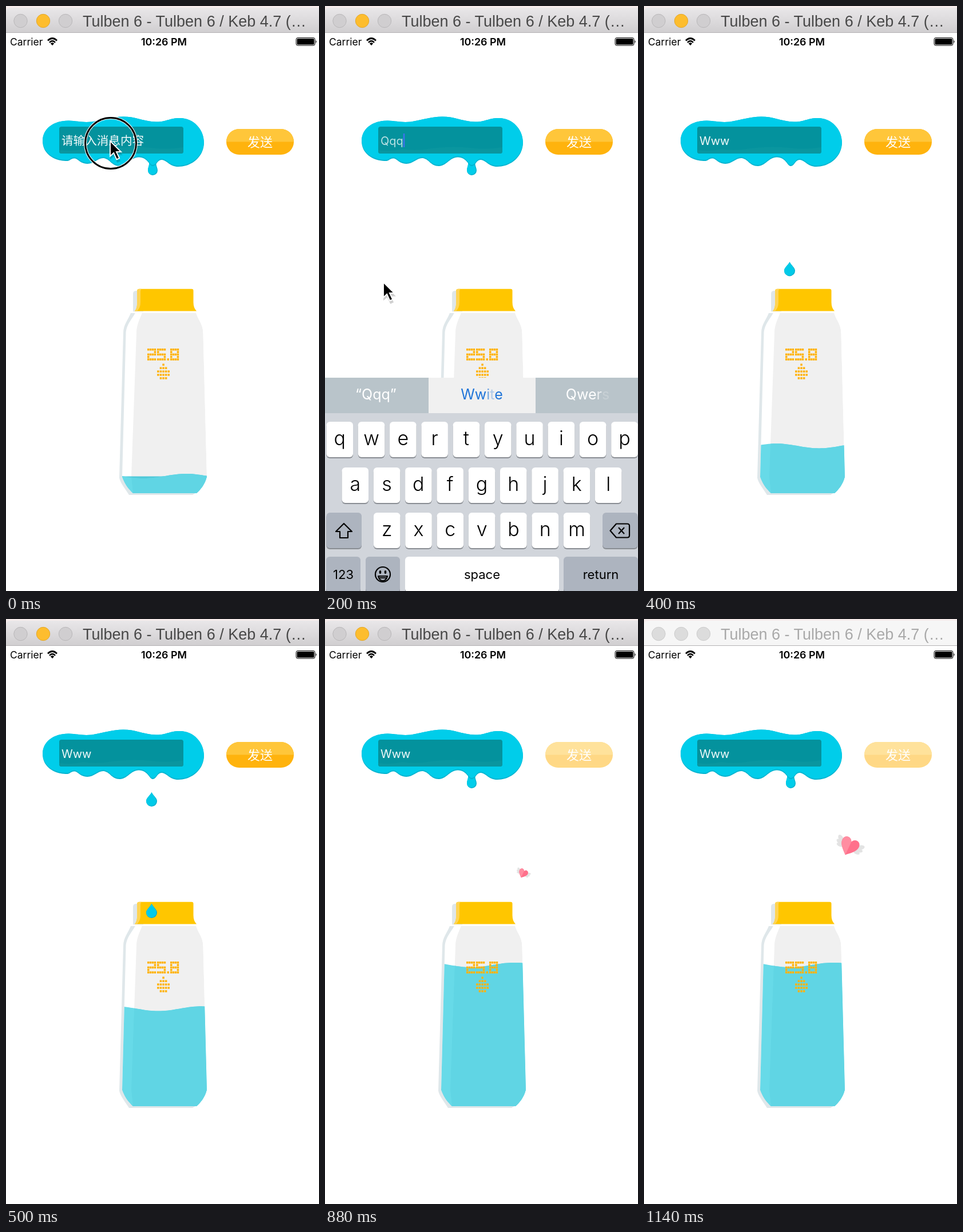
These frames come from a looping animation (547 by 1023 pixels, 1.16 s). An HTML page:

```html
<!DOCTYPE html>
<html lang="zh">
<head>
<meta charset="utf-8">
<style>
html, body { margin: 0; width: 100%; height: 100%; overflow: hidden; background: #fff; }
svg { display: block; width: 100vw; height: 100vh; font-family: Inter, "Noto Sans CJK SC", "Noto Sans CJK", sans-serif; }
.mid { text-anchor: middle; }
.title { font: 27px "Liberation Sans", Arial, sans-serif; }
</style>
</head>
<body>
<svg viewBox="0 0 547 1023" preserveAspectRatio="none">
  <defs>
    <linearGradient id="bar" x2="0" y2="1">
      <stop stop-color="#e9e7e9"/><stop offset="1" stop-color="#d0ced0"/>
    </linearGradient>
    <path id="blob" d="M64 236C64 214 84 200 110 200.500C125 201 132 204 150 202.500C172 199 185 193.500 205 193.500C228 193.500 240 202 262 202.500C280 203 285 196 304 196C328 196 346 216 346 239C346 262 326 281 301 281C286 281 282 270 272 269C264 269 263 280 256.500 280C250 280 249 265 232 264.500C218 264.500 212 280 199 280C184 280 182 267 170 266C160 266 154 276 142 276C130 276 126 267 120 266.500C113 266 112 272 104 271C80 270 64 256 64 236Z"/>
    <path id="glass" d="M226 536C222 546 210 556 209.500 573L203 823C208 838 216 846 222 852H333C340 846 348 836 351 823L344.500 572C344.500 556 335 548 332 536Z"/>
    <path id="face" d="M238 536C235 546 228 556 228 572L219 823L222 852H333C340 846 348 836 351 823L344.500 572C344.500 556 335 548 332 536Z"/>
    <path id="liquid"/>
    <path id="heartShape" d="M0 16C-6 10 -16 3 -16 -6C-16 -12 -12 -15 -8 -15C-4 -15 -1 -12 0 -9C1 -12 4 -15 8 -15C12 -15 16 -12 16 -6C16 3 6 10 0 16Z"/>
    <g id="wing" fill="#e3e3e3">
      <ellipse cx="19" cy="-7" rx="7" ry="4" transform="rotate(-35 19 -7)"/>
      <ellipse cx="18" cy="-1" rx="7" ry="3.500" transform="rotate(-10 18 -1)"/>
      <ellipse cx="16" cy="4" rx="6" ry="3"/>
    </g>
    <g id="drop">
      <path fill="#00b0cf" d="M0 0C3 6 9.500 10 9.500 15.500A9.500 9.500 0 0 1-9.500 15.500C-9.500 10-3 6 0 0Z"/>
      <path fill="#00cae8" d="M0 0C3 6 8 10 8 15A8.700 8.500 0 0 1-9.500 15.500C-9.500 10-3 6 0 0Z"/>
    </g>
    <clipPath id="blobClip"><use href="#blob"/></clipPath>
    <clipPath id="glassClip"><use href="#glass"/></clipPath>
    <clipPath id="faceClip"><use href="#face"/></clipPath>
    <clipPath id="fieldClip"><rect x="93" y="211" width="217" height="47" rx="4"/></clipPath>
    <clipPath id="leftHalf"><path d="M-20-20H0V20H-20Z"/></clipPath>
  </defs>

  <rect width="547" height="1023" fill="#fff"/>

  <!-- window bar -->
  <rect width="547" height="14" fill="#f6ecec"/>
  <path id="barFill" d="M0 47V9Q1 3 8 3H547V47Z"/>
  <path d="M0 46.500H547" stroke="#b4b2b4"/>
  <g id="lights" stroke-width="1">
    <circle cx="25.500" cy="26" r="11.700"/><circle cx="65" cy="26" r="11.700"/><circle cx="104" cy="26" r="11.700"/>
  </g>
  <text id="title" class="title" x="134" y="35.500">Tulben 6 - Tulben 6 / Keb 4.7 (…</text>

  <!-- status bar -->
  <text x="7" y="68.500" font-size="17.500">Carrier</text>
  <g fill="none" stroke="#000" stroke-width="2.600">
    <path d="M73 60.500Q81 52.500 89 60.500M76 63.800Q81 58.500 86 63.800"/>
  </g>
  <path d="M77.800 65.500Q81 62.500 84.200 65.500L81 69Z"/>
  <text class="mid" x="276" y="68.500" font-size="17.900" font-weight="600">10:26 PM</text>
  <rect x="507" y="55.500" width="33" height="13.500" rx="3" fill="none" stroke="#000"/>
  <rect x="508.500" y="57" width="30" height="10.500" rx="1.500"/>
  <path d="M541.500 60Q544 62 541.500 65Z"/>

  <!-- input -->
  <g id="bulb">
    <path fill="#00b4d0" d="M250 272C251 279 248 282 248 287.500A8.500 8.500 0 0 0 265 287.500C265 282 261 279 263 272Z"/>
    <path fill="#00cdea" d="M250 272C251 279 248 282 248 286.500A7.700 8 0 0 0 263.500 286.500C263.500 282 259.500 279 261.500 272Z"/>
  </g>
  <use href="#blob" fill="#00b4d0"/>
  <g clip-path="url(#blobClip)">
    <use href="#blob" y="-2" fill="#00cdea"/>
  </g>
  <g clip-path="url(#fieldClip)">
    <rect x="93" y="211" width="217" height="47" fill="#04929d"/>
    <path fill="#0a969f" d="M93 258V252Q115 255 135 250Q160 254 185 249Q225 244 262 249Q288 251 310 247V258Z"/>
  </g>
  <text id="entry" x="97" y="243" fill="#fff"/>
  <rect id="caret" x="136" y="223" width="2.500" height="24" fill="#3f72ee"/>

  <g id="button">
    <rect x="385" y="215" width="118" height="45" rx="22.500" fill="#ffb30d"/>
    <path fill="#ffc63a" d="M385 237.500A22.500 22.500 0 0 1 407.500 215H480.500A22.500 22.500 0 0 1 503 237.500Z"/>
    <text class="mid" x="444" y="246" font-size="22" font-weight="500" fill="#fff">发送</text>
  </g>

  <!-- bottle -->
  <path fill="#dfe7ea" d="M222 503Q222 498 228 498H240V536H222ZM218 537C213 550 205 557 205 572L198 825C199 833 210 847 215 855H326L334 850L240 537Z"/>
  <use href="#glass" fill="#fff"/>
  <g clip-path="url(#glassClip)"><use href="#face" fill="#f0f0f0"/></g>
  <g clip-path="url(#glassClip)">
    <path d="M190 822.500H360V860H190Z" fill="#50c9d9"/>
    <use href="#liquid" fill="#67dae8"/>
    <g clip-path="url(#faceClip)"><use href="#liquid" fill="#60d5e4"/></g>
  </g>
  <path fill="#ffc600" d="M229 498.500Q229 494.700 233 494.700H324.500Q327.500 494.700 327.500 498V518Q327.500 528 333 533.500H225Q229 529 229 522Z"/>
  <path fill="#ffd452" d="M229 498.500Q229 494.700 233 494.700H237Q235 495.500 235 500V518Q235 528 229 533.500H225Q229 529 229 522Z"/>
  <path d="M216 535.500H336" stroke="#fff" stroke-width="2.500"/>
  <g id="display" fill="#ffb30d"></g>

  <g id="drops"></g>

  <path id="trail" fill="none" stroke="#a5a5a5" stroke-width=".8" d="M330 488C338 487 343 476 340 470C337 466 333 471 335 475C338 480 346 473 345 462"/>
  <g id="heart">
    <use href="#wing"/><use href="#wing" transform="scale(-1 1)"/>
    <use href="#heartShape" fill="#ff708b"/>
    <g clip-path="url(#leftHalf)"><use href="#heartShape" fill="#ff8da1"/></g>
  </g>

  <g id="keyboard">
    <rect y="650" width="547" height="380" fill="#d1d5db"/>
    <rect y="650" width="547" height="62" fill="#b9c4ca"/>
    <rect x="181" y="650" width="187" height="62" fill="#f0f0f0"/>
    <g id="hints" class="mid" font-size="25" fill="#fff">
      <text x="89" y="688"/><text x="274" y="688" fill="#1f74d8"/><text x="459" y="688"/>
    </g>
    <g id="keys" class="mid"></g>
    <g fill="none" stroke="#000" stroke-width="2.200" stroke-linejoin="round">
      <path d="M33 905L47 919H40V930H26V919H19Z"/>
      <path d="M509 905.500H528Q532 905.500 532 909V926Q532 929.500 528 929.500H509L498.500 917.500ZM513 912L523 923M523 912L513 923"/>
      <circle cx="101" cy="994" r="13"/>
      <path d="M93 997H109Q107 1005 101 1005Q95 1005 93 997ZM94 1000H108"/>
    </g>
    <ellipse cx="96.500" cy="990" rx="1.800" ry="3"/><ellipse cx="105.500" cy="990" rx="1.800" ry="3"/>
  </g>

  <g id="pointer">
    <g id="press" fill="none">
      <circle cx="1" cy="4" r="44.500" stroke="#fff" stroke-width="5"/>
      <circle cx="1" cy="4" r="44.500" stroke="#000" stroke-width="3"/>
    </g>
    <g transform="translate(0 1) scale(.95)">
      <path opacity=".18" transform="translate(1 3)" d="M-1-2V30L6 24L12 36L18 33L13 22H22Z"/>
      <path stroke="#fff" stroke-width="2" d="M0-1V27L6.500 21L12 33L17 30.500L11.500 19H20Z"/>
    </g>
  </g>
</svg>
<script>
const LOOP = 1160, STEP = 20;
const $ = id => document.getElementById(id);
const clamp = (v, lo = 0, hi = 1) => Math.min(hi, Math.max(lo, v));
const ramp = (t, from, to) => clamp((t - from) / (to - from));
const ease = p => p * p * (3 - 2 * p);
const mix = (a, b, p) => a + (b - a) * p;
const show = (el, on) => el.setAttribute('visibility', on ? 'visible' : 'hidden');
const move = (el, x, y, more = '') => el.setAttribute('transform', `translate(${x} ${y}) ${more}`);

function buildKeys() {
  const key = (x, y, w, label = '', fill = '#fff', size = 34) => {
    const box = `x="${x}" width="${w}" height="62" rx="6"`;
    const base = y + (size > 30 ? 40.5 : 39);
    return `<rect ${box} y="${y + 2}" fill="#898d93"/><rect ${box} y="${y}" fill="${fill}"/>` +
      `<text x="${x + w / 2}" y="${base}" font-size="${size}" font-weight="${size > 30 ? 300 : 400}">${label}</text>`;
  };
  const row = (letters, x, y) => [...letters].map((c, i) => key(x + i * 55.3, y, 46.5, c)).join('');
  const grey = '#adb4bf';
  $('keys').innerHTML = row('qwertyuiop', 2.5, 727) + row('asdfghjkl', 29.5, 807) + row('zxcvbnm', 85, 886) +
    key(2.5, 886, 61.5, '', grey) + key(485, 886, 61.5, '', grey) +
    key(2, 963, 60, '123', grey, 22) + key(71, 963, 60, '', grey) +
    key(140, 963, 269, 'space', '#fff', 22) + key(417, 963, 130, 'return', grey, 22);
}

function buildDisplay() {
  let dots = '';
  const dot = (x, y) => dots += `<rect x="${x}" y="${y}" width="3.5" height="3.6"/>`;
  const digits = [['1111 0001 1111 1000 1111', 247], ['1111 1000 1111 0001 1111', 264], ['1111 1001 1111 1001 1111', 287]];
  for (const [rows, x] of digits)
    rows.split(' ').forEach((bits, r) => [...bits].forEach((b, c) => +b && dot(x + c * 3.9, 599 + r * 4.3)));
  dot(281.5, 616.2);
  [1, 3, 5, 5, 3].forEach((n, r) => {
    for (let c = 0; c < n; c++) dot(273.3 + (c - (n - 1) / 2) * 4.6, 625.5 + r * 5.9);
  });
  $('display').innerHTML = dots;
}

buildKeys();
buildDisplay();
$('drops').innerHTML = '<use href="#drop"/>'.repeat(5);

const entries = [[0, '请输入消息内容'], [100, 'Q'], [140, 'Qq'], [180, 'Qqq'], [220, 'Www']];
const route = [[0, 182, 236], [40, 182, 236], [140, 102, 483], [200, 102, 483], [250, 440, 240], [260, 440, 240], [300, 521, 591], [340, 570, 640]];

function drawPointer(t) {
  show($('pointer'), t < 340);
  show($('press'), t < 40);
  const i = Math.max(1, route.findIndex(p => p[0] > t));
  const [a, b] = [route[i - 1], route[i]];
  const p = ease(ramp(t, a[0], b[0]));
  move($('pointer'), mix(a[1], b[1], p), mix(a[2], b[2], p));
}

function drawInput(t) {
  const word = entries.filter(e => e[0] <= t).pop()[1];
  const blank = t < 100, editing = t >= 60 && t < 240;
  const entry = $('entry');
  entry.textContent = word;
  entry.setAttribute('font-size', blank ? 20.6 : 20);
  entry.setAttribute('opacity', !blank && editing ? .72 : .95);
  show($('caret'), editing);
  $('caret').setAttribute('x', blank ? 97 : 97 + entry.getComputedTextLength());

  const [left, centre, right] = $('hints').children;
  left.textContent = blank ? 'I' : `“${word}”`;
  right.innerHTML = blank ? "I'm" : 'Qwe<tspan opacity=".7">r</tspan><tspan opacity=".2">s</tspan>';
  centre.innerHTML = blank ? 'The' : 'Ww<tspan opacity=".6">i</tspan><tspan opacity=".3">t</tspan>e';

  const up = ease(ramp(t, 20, 100)) * (1 - ease(ramp(t, 230, 280)));
  show($('keyboard'), up > 0);
  move($('keyboard'), 0, 375 * (1 - up));
  $('button').setAttribute('opacity', t < 600 ? 1 : .5);
  $('bulb').setAttribute('opacity', t < 500 ? 1 - ramp(t, 240, 320) : ramp(t, 600, 660));
}

function drawLiquid(t) {
  const level = mix(822, 605, ramp(t, 340, 587));
  const trough = 240 + 1.1 * (clamp(t, 340, 627) - 340);
  let d = 'M198 860';
  for (let x = 198; x <= 358; x += 4)
    d += `L${x} ${(level + 4.1 * Math.cos((x - trough) * Math.PI / 75)).toFixed(2)}`;
  $('liquid').setAttribute('d', d + 'V860Z');

  [...$('drops').children].forEach((el, k) => {
    const u = (t - 260 - k * 80) / 80;
    const y = 303 + 185 * u + 10 * u * u;
    show(el, u > -.12 && y < 522);
    move(el, 254.5, y);
  });
}

function drawHeart(t) {
  show($('heart'), t >= 640);
  const rise = ease(ramp(t, 640, 720)), grow = ease(ramp(t, 880, 1140));
  const x = mix(mix(331, 346, rise), 358.5, grow);
  const y = mix(mix(488, 447, rise) - 2 * ramp(t, 720, 880), 398, grow);
  const scale = mix(mix(.2, .5, rise), 1, grow);
  move($('heart'), x, y, `rotate(25) scale(${scale})`);
  show($('trail'), t >= 700 && t < 840);
  $('trail').setAttribute('opacity', 1 - ramp(t, 740, 840));
}

function drawWindow(t) {
  const active = t < 1100;
  $('barFill').setAttribute('fill', active ? 'url(#bar)' : '#f6f6f6');
  $('title').setAttribute('fill', active ? '#484848' : '#a9a9a9');
  [...$('lights').children].forEach((el, i) => {
    const amber = active && i === 1;
    el.setAttribute('fill', amber ? '#fdbd2e' : active ? '#d0ced0' : '#dcdcdc');
    el.setAttribute('stroke', amber ? '#e3a728' : active ? '#b9b7b9' : '#cbcbcb');
  });
}

function draw(t) {
  drawWindow(t);
  drawInput(t);
  drawLiquid(t);
  drawHeart(t);
  drawPointer(t);
}

const start = performance.now();
function tick() {
  const t = (performance.now() - start) % LOOP;
  draw(Math.floor(t / STEP) * STEP);
  requestAnimationFrame(tick);
}
tick();
</script>
</body>
</html>
```
